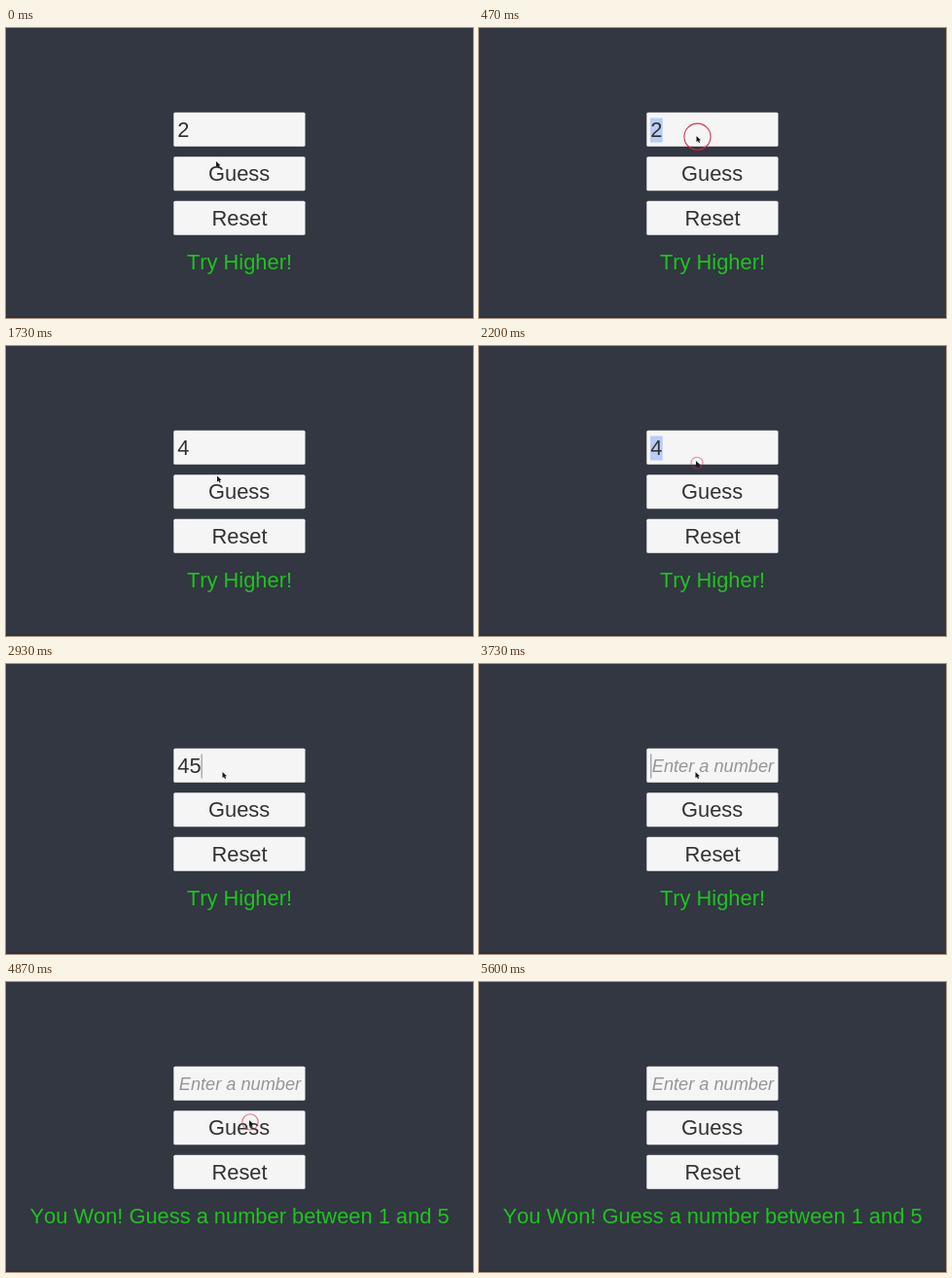
An HTML page for the animation above (6470 ms loop, 480 by 298 pixels).

```html
<!DOCTYPE html>
<html lang="en">
<meta charset="utf-8">
<title>Guess a number</title>
<style>
  html, body { margin: 0; height: 100%; overflow: hidden; background: #323741; }
  svg { display: block; width: 480px; height: 298px; }
  text { font: 21.85px "Liberation Sans", Arial, sans-serif; font-kerning: none; fill: #323232; }
  .box { x: 172.3px; width: 135.2px; height: 35px; rx: 1.5px; fill: #f5f5f5; }
  .mid { text-anchor: middle; }
  #hint { font-size: 18.2px; font-style: italic; fill: #959595; }
  #message { fill: #1ec41e; }
</style>
<svg viewBox="0 0 480 298">
  <rect y="296.5" width="480" height="1.5" fill="#302f3b"/>
  <rect class="box" id="field" y="86.7"/>
  <rect class="box" id="guess" y="132.2"/>
  <rect class="box" y="177.7"/>
  <rect id="selection" x="176" y="92.5" width="12.7" height="25" fill="#b9cef5"/>
  <text id="hint" x="177.8" y="110.5">Enter a number</text>
  <text id="value" x="176.3" y="112"></text>
  <rect id="caret" y="92.5" width="1" height="25" fill="#888"/>
  <text class="mid" x="239.6" y="157">Guess</text>
  <text class="mid" x="240" y="202.7">Reset</text>
  <text class="mid" id="message" x="240" y="247.8"></text>
  <circle id="ring" fill="none" stroke="#d3254a" stroke-width="1.1"/>
  <path id="pointer" d="M0 0V6L1.5 4.9 2.5 7 3.6 6.5 2.7 4.5 4.5 4.3Z" fill="#1a1a1a"/>
</svg>
<script>
const LOOP = 6470, FADE = 100, PRESS = 240, MOVE = 240, RING = 340, BLINK = 610;

// Each move eases the pointer from the previous spot
const moves = [
  { at: -MOVE, x: 216, y: 137 },
  { at: 70, x: 223.5, y: 111 },
  { at: 1130, x: 217, y: 133.5 },
  { at: 1730, x: 223, y: 118 },
  { at: 2470, x: 222.5, y: 111 },
  { at: 4430, x: 250, y: 142 },
  { at: 5240, x: 128, y: 302 }
];
const clicks = [
  { at: -LOOP, on: "guess" },
  { at: 330, on: "field", selects: true },
  { at: 1300, on: "guess" },
  { at: 1930, on: "field", selects: true },
  { at: 2470, on: "field" },
  { at: 4630, on: "guess" }
];
const WIN = clicks.at(-1).at + PRESS;
const edits = [
  { at: -LOOP, value: "2" },
  { at: 1000, value: "4" },
  { at: 2790, value: "45" },
  { at: 3600, value: "4" },
  { at: 3730, value: "" },
  { at: 3930, value: "5" },
  { at: WIN, value: "" }
];

const $ = id => document.getElementById(id);
const clamp = v => Math.max(0, Math.min(1, v));
const mix = (a, b, p) => a + (b - a) * p;
const grey = v => `rgb(${v},${v},${v})`;
const set = (id, attrs) => {
  for (const name in attrs) $(id).setAttribute(name, attrs[name]);
};
const show = (id, on) => set(id, { visibility: on ? "visible" : "hidden" });

// Latest entry at time t and the one before it
function latest(list, t) {
  const i = list.findLastIndex(e => e.at <= t);
  return [list[i], list[Math.max(0, i - 1)]];
}

function draw(t) {
  const [move, from] = latest(moves, t);
  const [click, lastClick] = latest(clicks, t);
  const [edit] = latest(edits, t);
  const age = t - click.at;

  const p = clamp((t - move.at) / MOVE), ease = p * p * (3 - 2 * p);
  const x = mix(from.x, move.x, ease), y = mix(from.y, move.y, ease);
  set("pointer", { transform: `translate(${x} ${y})` });

  const onGuess = c => +(c.on === "guess");
  const focus = mix(onGuess(lastClick), onGuess(click), clamp(age / FADE));
  const press = onGuess(click) * clamp(Math.min(age, PRESS + FADE - age) / FADE);
  set("guess", { fill: grey(245 - 11 * focus - 34 * press) });
  set("field", { fill: grey(245 + 10 * focus) });

  const editing = click.on === "field";
  const selected = editing && click.selects && edit.at < click.at;
  const idle = t - Math.max(click.at, edit.at);
  $("value").textContent = edit.value;
  $("message").textContent = t < WIN ? "Try Higher!" : "You Won! Guess a number between 1 and 5";
  show("hint", !edit.value);
  show("selection", selected);
  show("caret", editing && !selected && idle % (2 * BLINK) < BLINK);
  set("caret", { x: 176.3 + edit.value.length * 12.15 });

  const q = clamp(age / RING);
  show("ring", q < 1);
  set("ring", { cx: x + 1, cy: y - 1 + 4 * q, r: 16.4 * (1 - q * q), opacity: 1 - q ** 3 });
}

const start = performance.now();
(function frame() {
  draw((performance.now() - start) % LOOP);
  requestAnimationFrame(frame);
})();
</script>
</html>
```
